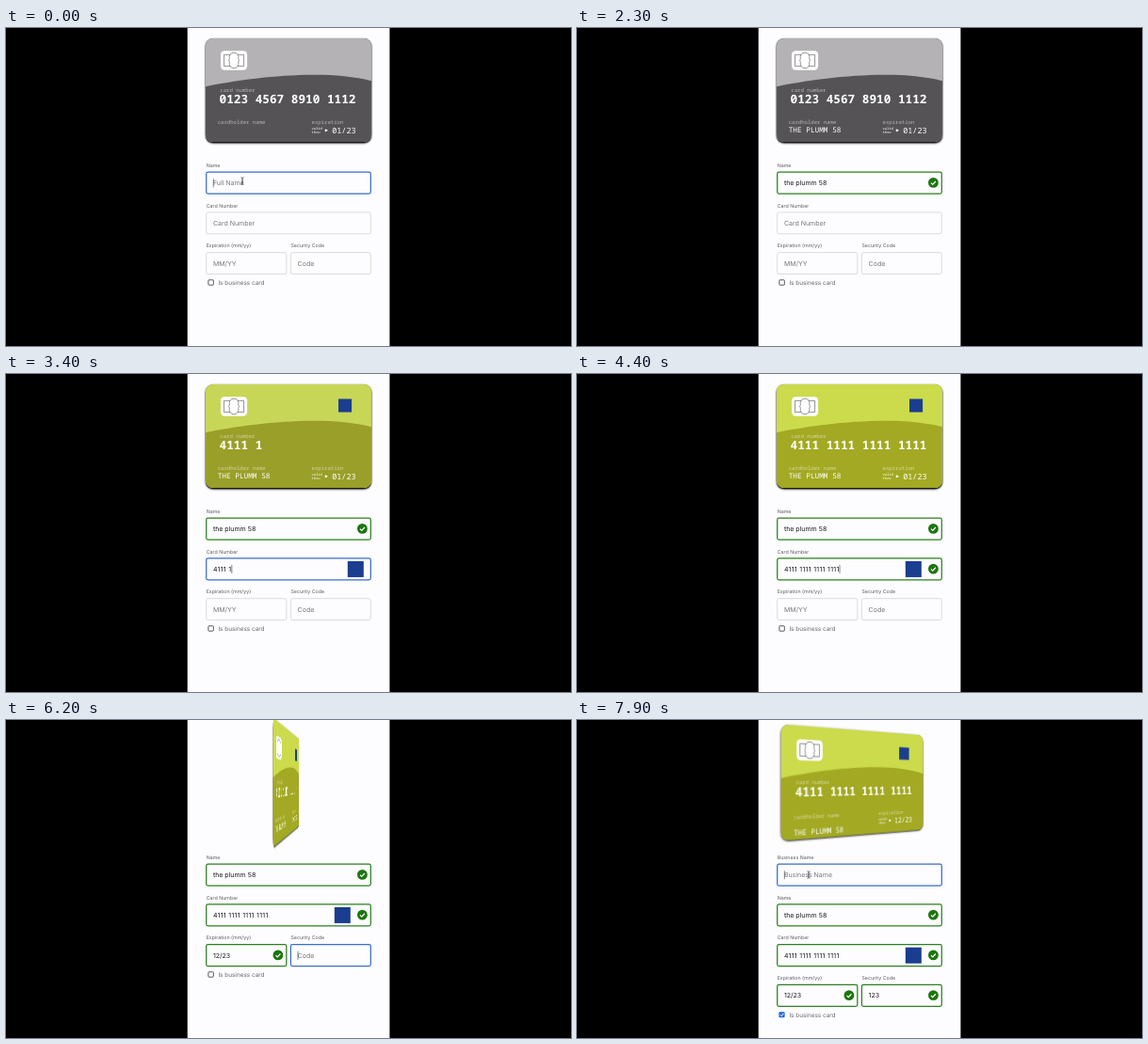
These frames come from a looping animation (600x338 px, 8 s). An HTML page:

```html
<!DOCTYPE html>
<html lang="en">
<head>
<meta charset="utf-8">
<title>Card form</title>
<style>
  html, body { margin: 0; width: 100%; height: 100%; overflow: hidden; background: #000; }
  #stage { position: relative; width: 600px; height: 338px; overflow: hidden; }
  #form { position: absolute; left: 0; top: 0; font-family: Inter, sans-serif; text-rendering: geometricPrecision; }
  #scene { position: absolute; left: 212px; top: 10.5px; width: 176px; height: 110.5px; perspective: 444px; }
  #card { width: 100%; height: 100%; transform-style: preserve-3d; }
  .face { position: absolute; inset: 0; border-radius: 8px; overflow: hidden;
    box-shadow: 0 1.6px 2px #000, 0 .5px 1.5px rgba(0,0,0,.7); backface-visibility: hidden; background: var(--dark); }
  .back { transform: rotateY(180deg); }
  .face svg { display: block; width: 100%; height: 100%; fill: #fff;
    font-family: "Noto Sans Mono", "DejaVu Sans Mono", monospace; text-rendering: geometricPrecision; }
  .tag { font-size: 24px; opacity: .55; }
  .tiny { font-size: 16px; }
</style>
</head>
<body>
<div id="stage">
  <svg id="form" width="600" height="338"></svg>
  <div id="scene"><div id="card">
    <div class="face">
      <svg viewBox="0 0 750 471">
        <path style="fill:var(--light)" d="M0 0H750V471H0Z"/>
        <path style="fill:var(--dark)" d="M750 471V193.2C532.4 135.7 193.6 179.7 0 218.1V471Z"/>
        <rect x="68" y="56" width="120" height="88" rx="18"/>
        <g fill="#fff" stroke="#666" stroke-width="3">
          <path d="M83 74H173V126H83Z"/>
          <path d="M108 92A21 21 0 1 1 148 92Q154 100 148 108A21 21 0 1 1 108 108Q102 100 108 92Z"/>
        </g>
        <rect id="mark" x="601" y="66" width="60" height="60" fill="#1b3d8f"/>
        <text class="tag" x="65" y="241.5">card number</text>
        <text id="number" x="62" y="295" font-size="54.2" font-weight="600"></text>
        <text class="tag" x="54" y="390">cardholder name</text>
        <text id="holder" x="54" font-size="33"></text>
        <text class="tag" x="479.8" y="389">expiration</text>
        <text id="date" x="572" y="431" font-size="36"></text>
        <text class="tiny" x="479.4" y="412">valid</text>
        <text class="tiny" x="479.4" y="431">thru</text>
        <path d="M554.5 417L540.4 410V424Z"/>
      </svg>
    </div>
    <div class="face back">
      <svg viewBox="0 0 750 471">
        <rect y="61.6" width="750" height="78" fill="#111"/>
        <rect x="43" y="183" width="661" height="65" fill="#f4f3f6"/>
        <path d="M43 198H601M43 216H601M43 234H601" stroke="#d9d9dd" stroke-width="8"/>
        <rect x="601" y="183" width="103" height="65" fill="#b9b9bb"/>
        <text id="code" x="622" y="227" font-size="28" fill="#111"></text>
        <text class="tag" x="518" y="279">security code</text>
        <rect x="58" y="378.6" width="375.5" height="13.5" fill="#f3f2e6"/>
        <rect x="58" y="405.6" width="421.7" height="13.5" fill="#f3f2e6"/>
      </svg>
    </div>
  </div></div>
</div>
<script>
const LOOP = 8000, FLIP = 300, GREEN = '#2d8021', BLUE = '#3a6ec6', PAGE = '#fdfcfe';
const $ = id => document.getElementById(id);
const pen = document.createElement('canvas').getContext('2d');
const clamp = x => Math.max(0, Math.min(1, x));
const mix = (a, b, k) => `rgb(${a.map((v, i) => Math.round(v + (b[i] - v) * k))})`;

// CSS "ease" curve: cubic-bezier(.25, .1, .25, 1)
function ease(x) {
  x = clamp(x);
  const curve = (a, b, s) => 3 * a * s * (1 - s) ** 2 + 3 * b * s * s * (1 - s) + s ** 3;
  let lo = 0, hi = 1;
  for (let i = 0; i < 20; i++) {
    const mid = (lo + hi) / 2;
    if (curve(.25, .25, mid) < x) lo = mid; else hi = mid;
  }
  return curve(.1, 1, lo);
}

const digitTimes = [3000, ...Array.from({ length: 15 }, (_, i) => 3150 + i * 82)];
const group = s => s.replace(/(.{4})(?=.)/g, '$1 ');
const slash = s => s.length > 2 ? s.slice(0, 2) + '/' + s.slice(2) : s;
const same = s => s;

// Each input: place, label, hint, raw text, key times, focus span, mask, minimum length, letter spacing
const inputs = {
  name: { x: 212.7, row: 0, w: 174.6, label: 'Name', hint: 'Full Name', raw: 'the plumm 58',
    keys: [500, 800, 900, 1000, 1150, 1250, 1330, 1420, 1500, 1560, 1600, 1800],
    focus: [0, 2500], mask: same, min: 1, gap: 0 },
  number: { x: 212.7, row: 1, w: 174.6, label: 'Card Number', hint: 'Card Number', raw: '4' + '1'.repeat(15),
    keys: digitTimes, focus: [2500, 4900], mask: group, min: 16, gap: .3 },
  date: { x: 212.7, row: 2, w: 85.1, label: 'Expiration (mm/yy)', hint: 'MM/YY', raw: '1223',
    keys: [5500, 5600, 5750, 5850], focus: [4900, 6120], mask: slash, min: 4, gap: 0 },
  code: { x: 302.4, row: 2, w: 84.9, label: 'Security Code', hint: 'Code', raw: '123',
    keys: [6500, 6650, 6800], focus: [6120, 7180], mask: same, min: 3, gap: 0 },
};
const business = { x: 212.7, row: 0, w: 174.6, label: 'Business Name', hint: 'Business Name', raw: '',
  keys: [], focus: [7720, LOOP], mask: same, min: 1, gap: 0 };

const ROW = 42.75, TICKED = 7200;
const count = (f, t) => f.keys.filter(k => k <= t).length;
const value = (f, t) => f.mask(f.raw.slice(0, count(f, t)));

function drawField(f, t, row) {
  const y = 153.2 + row * ROW, n = count(f, t), text = value(f, t), valid = n >= f.min;
  const focused = t >= f.focus[0] && t < f.focus[1];
  const border = valid ? GREEN : focused ? BLUE : '#dcdbe0';
  let out = `<text x="${f.x}" y="${y - 5.4}" font-size="5.3" fill="#5c5c62">${f.label}</text>
    <rect x="${f.x}" y="${y}" width="${f.w}" height="22.8" rx="1.8" fill="${PAGE}"
      stroke="${border}" stroke-width="${valid || focused ? 1.25 : 1}"/>
    <text x="${f.x + 7.2}" y="${y + 13.9}" font-size="7" letter-spacing="${text ? f.gap : 0}"
      fill="${text ? '#151517' : '#77777c'}">${text || f.hint}</text>`;
  const last = n ? f.keys[n - 1] : f.focus[0];
  if (focused && (t - last) % 1000 < 500) {
    const cx = f.x + 7.6 + pen.measureText(text).width + f.gap * text.length;
    out += `<path d="M${cx} ${y + 7}v9" stroke="#333" stroke-width=".6"/>`;
  }
  const right = f.x + f.w;
  if (valid) out += `<circle cx="${right - 8.9}" cy="${y + 11.2}" r="5.4" fill="#1c760f"/>
    <path d="M${right - 11.3} ${y + 11.4}l1.7 1.7 3.2-3.3" fill="none" stroke="#fff" stroke-width="1.2"/>`;
  if (f === inputs.number && n)
    out += `<rect x="${right - (valid ? 38.5 : 24.5)}" y="${y + 3}" width="17" height="17" fill="#1b3d8f"/>`;
  return out;
}

function drawCheckbox(on, y) {
  const box = on
    ? `<rect x="214.4" y="${y - 3.1}" width="6.2" height="6.2" rx="1" fill="#2468dc"/>
       <path d="M215.8 ${y + .1}l1.3 1.4 2.3-2.9" fill="none" stroke="#fff"/>`
    : `<rect x="214.9" y="${y - 2.7}" width="5.4" height="5.4" rx=".6" fill="#fff" stroke="#444" stroke-width=".9"/>`;
  return box + `<text x="225.4" y="${y + 2.4}" font-size="6.4" fill="#66666b">Is business card</text>`;
}

const path = [[6800, 251, 162], [7000, 227.5, 271.5], [7150, 218, 270], [7300, 218, 270], [7700, 246, 164.5]];
function drawPointer(t) {
  if (t >= 500 && t < 6800) return '';
  let x = 251, y = 162.5;
  if (t >= 6800) {
    [, x, y] = path[path.length - 1];
    for (let i = 1; i < path.length; i++) {
      const a = path[i - 1], b = path[i];
      if (t < b[0]) {
        const k = (t - a[0]) / (b[0] - a[0]);
        x = a[1] + (b[1] - a[1]) * k;
        y = a[2] + (b[2] - a[2]) * k;
        break;
      }
    }
  }
  const overField = y < 262 && (y - 153) % ROW < 23;
  return overField
    ? `<path d="M${x - 1.6} ${y - 3.8}q1.6 0 1.6 1v5.6q0 1-1.6 1M${x + 1.6} ${y - 3.8}q-1.6 0-1.6 1v5.6q0 1 1.6 1"
        fill="none" stroke="#333" stroke-width=".6"/>`
    : `<path d="M${x} ${y}v6l1.4-1.2 1 2.2 1-.5-1-2.1h1.9Z" fill="#000" stroke="#fff" stroke-width=".4"/>`;
}

function draw(t) {
  const { name, number, date, code } = inputs, ticked = t >= TICKED, shift = ticked ? 1 : 0;
  pen.font = '7px Inter, sans-serif';
  $('form').innerHTML = `<rect x="192.7" width="214.7" height="338" fill="${PAGE}"/>`
    + (ticked ? drawField(business, t, 0) : '')
    + Object.values(inputs).map(f => drawField(f, t, f.row + shift)).join('')
    + drawCheckbox(ticked, 270.5 + shift * ROW) + drawPointer(t);

  $('number').textContent = value(number, t) || '0123 4567 8910 1112';
  $('holder').textContent = value(name, t).toUpperCase();
  $('holder').setAttribute('y', ticked ? 458 : 428); // leaves a line for the business name
  $('date').textContent = value(date, t) || '01/23';
  $('code').textContent = value(code, t) || '985';
  $('mark').style.opacity = count(number, t) ? 1 : 0;

  const tint = ease((t - 3100) / 500), card = $('card').style;
  card.setProperty('--light', mix([180, 178, 181], [203, 219, 75], tint));
  card.setProperty('--dark', mix([85, 83, 86], [163, 169, 35], tint));
  const angle = 180 * (ease((t - 6120) / FLIP) - ease((t - 7745) / FLIP));
  card.transform = `rotateY(${angle}deg)`;
}

const start = performance.now();
function tick() {
  draw((performance.now() - start) % LOOP);
  requestAnimationFrame(tick);
}
tick();
</script>
</body>
</html>
```
